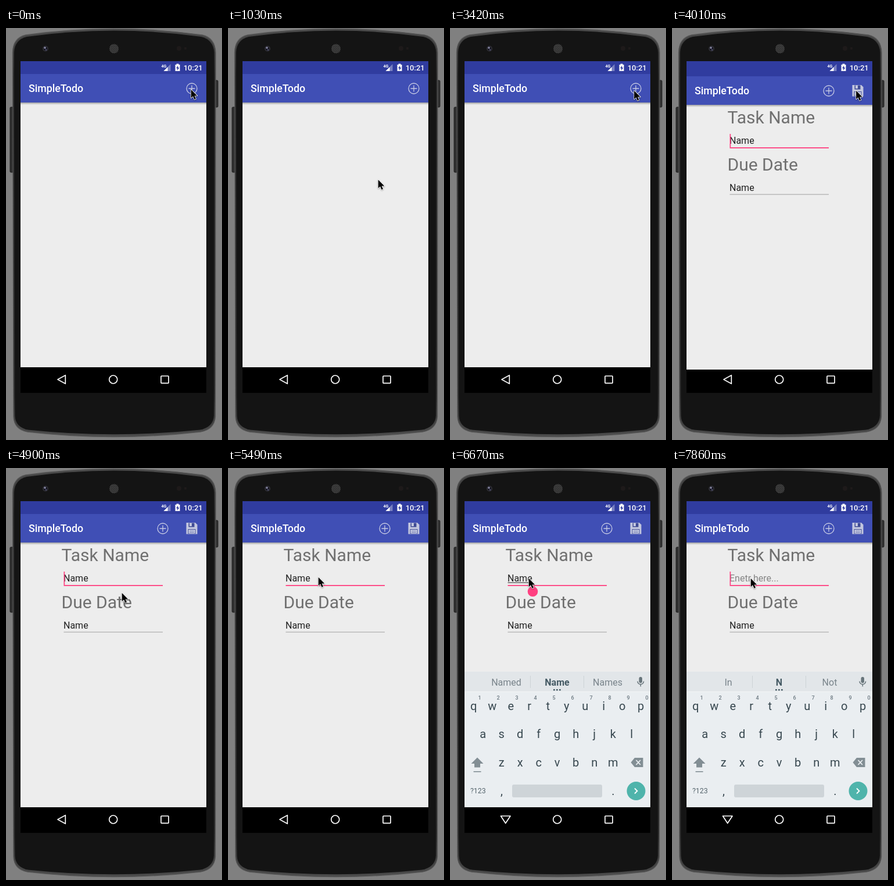
These frames come from a looping animation (372x708 px, 8000 ms). An HTML page:

```html
<!DOCTYPE html>
<html lang="en">
<head>
<meta charset="utf-8">
<title>SimpleTodo</title>
<style>
  html, body { margin: 0; width: 100%; height: 100%; overflow: hidden; background: #808080; }
  svg { display: block; width: 372px; height: 708px; }
  text { font-family: Roboto, "Open Sans", sans-serif; white-space: pre; }
  .mid { text-anchor: middle; }
  .medium { font-weight: 500; }
  .head { font-size: 30px; fill: #707070; }
  .field { font-size: 16px; fill: #202020; }
  .key { font-size: 20px; fill: #37474f; }
  .num { font-size: 9px; font-weight: 500; fill: #6b7880; }
  .word { font-size: 16px; fill: #78838a; }
  .line { fill: none; stroke: #fff; stroke-width: 1.7; stroke-linejoin: round; }
</style>
</head>
<body>
<svg viewBox="0 0 372 708">
  <defs>
    <linearGradient id="shade" x2="0" y2="1">
      <stop offset="0" stop-color="#000" stop-opacity=".32"/>
      <stop offset="1" stop-color="#000" stop-opacity="0"/>
    </linearGradient>
    <linearGradient id="side" x2="0" y2="1">
      <stop offset="0" stop-color="#4a4a4a"/>
      <stop offset=".12" stop-color="#2a2a2a"/>
      <stop offset=".9" stop-color="#2a2a2a"/>
      <stop offset="1" stop-color="#4c4c4c"/>
    </linearGradient>
    <pattern id="mesh" width="3" height="3" patternUnits="userSpaceOnUse">
      <rect width="3" height="3" fill="#1c1c1c"/>
      <circle cx=".8" cy=".8" r=".8" fill="#696969"/>
      <circle cx="2.3" cy="2.3" r=".8" fill="#595959"/>
    </pattern>
    <clipPath id="screen"><rect x="25" y="57" width="320" height="570"/></clipPath>
    <g id="plus" fill="none" stroke="#c6cae4" stroke-width="1.3">
      <circle r="9"/><path d="M-5.5 0H5.5M0 -5.5V5.5"/>
    </g>
    <g id="disk">
      <path d="M-9.5 -10H6L9.5 -6.500V9.500H-9.500Z" fill="#c3c7df"/>
      <path d="M-5.500 -9.500H4.500V-2.500H-5.500Z" fill="#3f4a94"/>
      <path d="M-4 -9.500H0V-4H-4Z" fill="#c3c7df"/>
      <path d="M-6.500 1H6.500V9H-6.500Z" fill="#3f4a94"/>
      <path d="M-5.500 2H5.500V8.500H-5.500Z" fill="#d3d6e8"/>
      <path d="M-4 4H4M-4 6.500H4" stroke="#6570ad"/>
    </g>
  </defs>

  <!-- phone -->
  <rect width="372" height="708" fill="#808080"/>
  <rect x="7" y="136" width="6" height="112" rx="1.500" fill="#303030" stroke="#1c1c1c"/>
  <rect x="359" y="90" width="6" height="46" rx="1.500" fill="#303030" stroke="#1c1c1c"/>
  <path d="M11.500 42Q12 17 34 12Q186 -9 338 12Q360 17 361 42L360.500 668Q359 690 335 694Q186 711 37 694Q14 690 13 668Z"
        fill="url(#side)" stroke="#555" stroke-width="1.300"/>
  <path d="M14 42Q15 20 36 15Q186 -6 336 15Q357 20 358.500 42L358 666Q357 686 334 690.500Q186 706 38 690.500Q16 686 15.500 666Z" fill="#141414"/>
  <circle cx="68" cy="35.500" r="5" fill="#2d2d33"/>
  <circle cx="68" cy="35.500" r="3" fill="#11111c"/>
  <circle cx="67" cy="34" r="1.800" fill="#8b8ba8"/>
  <circle cx="69" cy="37.500" r="1.200" fill="#55557a"/>
  <circle cx="186" cy="35.500" r="8" fill="url(#mesh)"/>
  <circle cx="298" cy="35" r="4" fill="#1e1a1a"/>
  <circle cx="309" cy="35" r="2.300" fill="#1e1a1a"/>

  <g clip-path="url(#screen)">
    <rect x="25" y="57" width="321" height="570"/>
    <rect x="25" y="57" width="320" height="22" fill="#303c9f"/>

    <g id="app">
      <rect x="25" y="57" width="320" height="22" fill="#303c9f"/>
      <rect x="25" y="79" width="320" height="504" fill="#ededed"/>
      <rect x="25" y="79" width="320" height="49" fill="#404fb5"/>
      <rect x="25" y="128" width="320" height="4" fill="url(#shade)"/>
      <text class="medium" x="39" y="110.300" font-size="17.800" fill="#fff">SimpleTodo</text>
      <use id="add" href="#plus"/>
      <g id="form">
        <use href="#disk" x="320" y="104"/>
        <text class="head" x="95.500" y="160.300">Task Name</text>
        <text class="head" x="95.500" y="241">Due Date</text>
        <text class="field" id="name" x="99" y="195"></text>
        <rect id="under" x="99.500" y="196.500" width="42.500" height="1" fill="#202020"/>
        <rect x="99.500" y="201" width="170.500" height="1.800" fill="#ff4081"/>
        <text class="field" x="99" y="275.700">Name</text>
        <rect x="99.500" y="281.500" width="170.500" height="1" fill="#a0a0a0"/>
        <rect id="caret" y="178" width="1.700" height="23" fill="#ff4081"/>
        <path id="drop" d="M142.500 201.500L148.700 206A8.800 8.800 0 1 1 136.300 206Z" fill="#ff4081"/>
      </g>
    </g>

    <g id="board">
      <rect x="25" y="350" width="320" height="233" fill="#eaeef1"/>
      <rect x="25" y="350" width="320" height="35" fill="#e2e6e9"/>
      <rect x="25" y="384" width="320" height="1" fill="#f3f5f6"/>
      <path d="M138.500 357V378M230.500 357V378" stroke="#cdd3d6"/>
      <g id="words"></g>
      <path d="M178 380h2.700v2.500h-2.700zM183 380h2.700v2.500h-2.700zM188 380h2.700v2.500h-2.700z" fill="#455a64"/>
      <rect x="325.500" y="359" width="5.500" height="10.500" rx="2.700" fill="#68757b"/>
      <path d="M323 366.500a5.300 5.300 0 0 0 10.600 0M328.300 372V375.500" fill="none" stroke="#68757b" stroke-width="1.500"/>
      <g id="keys"></g>
      <path d="M47 497.500L57.500 508H52V514.500H42V508H36.500Z" fill="#828e94"/>
      <rect x="40.500" y="521" width="13" height="1.600" fill="#828e94"/>
      <path d="M311.500 506L318 498H332.500V514H318Z" fill="#828e94"/>
      <path d="M320.500 502L328 510M328 502L320.500 510" stroke="#eaeef1" stroke-width="1.800"/>
      <rect x="107" y="544" width="155" height="22" rx="3" fill="#ced4d8"/>
      <text x="35" y="559" font-size="12.300" fill="#55646c">?123</text>
      <circle cx="320.500" cy="555" r="16" fill="#4fb4ab"/>
      <path d="M318 550.500L322.500 555L318 559.500" fill="none" stroke="#fff" stroke-width="1.800"/>
    </g>

    <path id="back" class="line"/>
    <circle class="line" cx="184.700" cy="604" r="7"/>
    <rect class="line" x="267" y="598" width="13" height="12.300" rx=".8"/>
  </g>

  <path id="mouse" d="M0 0V14.500L3.400 11.500L5.800 17L8.300 16L5.900 10.700H10.600Z"
        stroke="#fff" stroke-width="1.500" stroke-linejoin="round" paint-order="stroke"
        style="filter:drop-shadow(0 1px 1px rgba(0,0,0,.35))"/>
</svg>
<script>
const LOOP = 8000;
const $ = id => document.getElementById(id);
const set = (el, props) => { for (const k in props) el.setAttribute(k, props[k]); };
const show = (el, on) => { el.style.display = on ? '' : 'none'; };

function label(parent, cls, x, y, str) {
  const el = document.createElementNS('http://www.w3.org/2000/svg', 'text');
  set(el, { class: 'mid ' + cls, x, y });
  el.textContent = str;
  return parent.appendChild(el);
}

const keys = $('keys');
[['qwertyuiop', 41, 415.5], ['asdfghjkl', 57, 464], ['zxcvbnm', 89, 513]].forEach(([row, x, y]) =>
  [...row].forEach((c, i) => label(keys, 'key', x + i * 32 - .3, y, c)));
[...'1234567890'].forEach((c, i) => label(keys, 'num', 51 + i * 32, 398, c));
label(keys, 'key', 89, 562, ',');
label(keys, 'key', 281, 562, '.');
const words = [97, 184.5, 271.5].map((x, i) => label($('words'), 'word', x, 373.7, ''));
set(words[1], { style: 'font-weight:700;fill:#455a64' });

// Each track: [start time, value...], held until the next start
const mouse = [
  [0, 318, 105], [590, 308, 130], [740, 284, 192], [890, 264, 245], [1030, 258, 260],
  [2530, 295, 217], [2680, 304, 190], [2830, 311, 162], [2980, 315, 138], [3120, 317, 121],
  [3270, 317, 110], [3420, 316.5, 107],
  [4450, 305, 118], [4600, 262, 152], [4750, 222, 192], [4900, 199, 214], [5050, 178, 192],
  [5190, 166, 189], [5340, 158, 187], [5490, 155, 187],
  [6380, 146, 188], [6520, 138, 189], [6670, 135, 189]
];
const slide = [[0, 0], [4010, 4], [4160, 0]];
const board = [[0, 0, 0], [5930, 30, .46], [6080, 13, .77], [6230, 2, .97], [6380, 0, 1]];
const caret = [[0, 1], [4450, 0], [4900, 1], [5490, 0], [5930, 1], [6670, 0], [7120, 1]];
const typed = [[0, 'Name'], [7120, 'Nam'], [7420, 'Na'], [7560, 'N'], [7860, '']];
const hints = [
  [0, 'Named', 'Name', 'Names'], [7270, 'Name', 'Nam', 'Names'],
  [7420, 'Me', 'Na', 'Name'], [7710, 'In', 'N', 'Not']
];
const at = (track, t) => track.findLast(s => s[0] <= t).slice(1);

const textEnd = { Name: 142, Nam: 133.5, Na: 119.5, N: 110.7, '': 99.5 };

function draw(t) {
  const [x, y] = at(mouse, t);
  set($('mouse'), { transform: `translate(${x + .7} ${y + .7})` });

  const form = t >= 4010, editing = t >= 5930;
  set($('app'), { transform: `translate(0 ${at(slide, t)[0]})` });
  set($('add'), { x: form ? 270 : 320, y: 104 });
  show($('form'), form);

  const [str] = at(typed, t);
  $('name').textContent = str || 'Enetr here...';
  $('name').style.fill = str ? '' : '#858585';
  set($('caret'), { x: editing ? textEnd[str] : 99.5 });
  show($('caret'), at(caret, t)[0]);
  show($('under'), editing && str);
  set($('under'), { width: Math.max(0, textEnd[str] - 99.5) });
  show($('drop'), editing && t < 7120);

  const [dy, alpha] = at(board, t);
  set($('board'), { transform: `translate(0 ${dy})`, opacity: alpha });
  show($('board'), editing);
  at(hints, t).forEach((w, i) => { words[i].textContent = w; });
  set($('back'), { d: editing ? 'M87.500 598H104L95.700 610.500Z' : 'M89 604L102.300 596.700V611.300Z' });
}

// Status icons
$('app').insertAdjacentHTML('afterend', `
  <text x="267.500" y="67.500" font-size="7" font-weight="700" fill="#fff">4G</text>
  <path d="M283.500 62V74H271.500Z" fill="#fff" opacity=".35"/>
  <path d="M278.500 67V74H271.500Z" fill="#fff"/>
  <path d="M293.500 61.500h4v1.500h2v11h-8v-11h2z" fill="#fff"/>
  <path d="M296.300 64.500L293 69.300H295.100V73L298.300 68H296.300Z" fill="#303c9f"/>
  <text class="medium" x="305.700" y="72.800" font-size="13" fill="#fff">10:21</text>`);

const start = performance.now();
function tick() {
  draw((performance.now() - start) % LOOP);
  requestAnimationFrame(tick);
}
draw(0);
requestAnimationFrame(tick);
</script>
</body>
</html>
```
